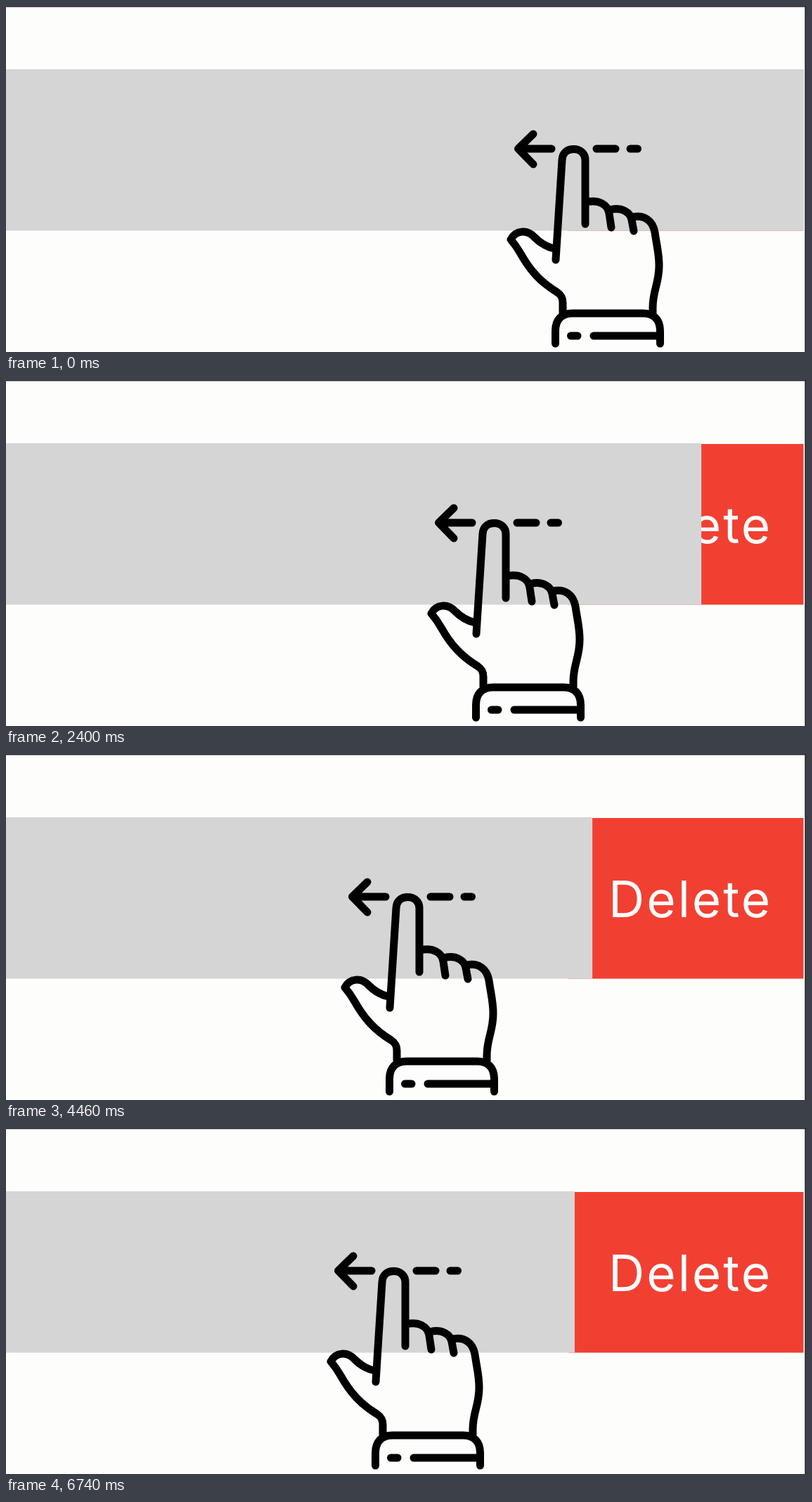
Write an HTML page that moves like this. It is 1138 by 492 pixels and loops after 6.76 s.

```html
<!DOCTYPE html>
<html lang="en">
<head>
<meta charset="utf-8">
<title>Swipe to delete</title>
<style>
  html, body { margin: 0; width: 100%; height: 100%; overflow: hidden; background: #fdfdfc; }
  svg { display: block; width: 1138px; height: 492px; }
  .label { font: 400 71px Inter, "Open Sans", sans-serif; letter-spacing: 3px; fill: #fff; }
  #hand { fill: none; stroke: #000; stroke-width: 11; stroke-linecap: round; stroke-linejoin: round; }
</style>
</head>
<body>
<svg viewBox="0 0 1138 492">
  <rect width="1138" height="492" fill="#fdfdfc"/>
  <rect x="800" y="91" width="334.5" height="228.5" fill="#f14032"/>
  <text class="label" x="857" y="232">Delete</text>
  <rect id="cover" y="90" width="1135" height="229.5" fill="#d5d5d5"/>
  <rect width="1138" height="1.5" fill="#25252b"/>
  <rect x="1136.3" width="1.7" height="492" fill="#25252b"/>
  <g id="hand">
    <!-- arrow and trail -->
    <path d="M750 182 L728.5 203 L750 225 M730 203 H776 M840 203 H867 M888 203 H898.5"/>
    <!-- index finger -->
    <path d="M782 361 L791 219 C791.5 209 798 203.500 807.500 203.500 C817 203.500 824 210 824 219 V310"/>
    <!-- knuckles and outer side -->
    <path d="M825 279 C843 275 856 282 858 295 L861 315"/>
    <path d="M860 289.500 C876 286 888 293 890 304 L893 320"/>
    <path d="M892 300 C908 297 920 305 923 322 C926 343 929 352 929 369 C929 395 920 404 920 429 V436"/>
    <!-- thumb -->
    <path d="M780 345 C767 342 759 336 752 329 C741 317 725 319 718 332 C724 339 728 345 732 352 C746 377 761 393 784 407 C790 411 792 415 792 422 V436"/>
    <!-- cuff -->
    <path d="M781.500 480 V462 C781.500 446 790 437 806 437 H906 C922 437 930.500 446 930.500 462 V480"/>
    <path d="M803.500 469 H813 M836 469 H930"/>
  </g>
</svg>
<script>
const LOOP = 6760;
// [time in ms, distance swiped in px]
const SWIPE = [
  [0, 0], [1190, 0], [1660, 41.5], [2400, 113], [2540, 125], [2960, 152.5],
  [3940, 214], [4460, 236], [4640, 244], [5440, 255.5], [6760, 256]
];
const hand = document.getElementById("hand");
const cover = document.getElementById("cover");

const slopes = SWIPE.slice(1).map(([t, x], i) => (x - SWIPE[i][1]) / (t - SWIPE[i][0]));

// Harmonic mean keeps the curve monotone between keys
function tangent(i) {
  const a = slopes[i - 1] || 0, b = slopes[i] || 0;
  return a * b > 0 ? 2 * a * b / (a + b) : 0;
}

function swipeAt(t) {
  let i = 0;
  while (i < SWIPE.length - 2 && t >= SWIPE[i + 1][0]) i++;
  const [t0, x0] = SWIPE[i], [t1, x1] = SWIPE[i + 1];
  const d = t1 - t0, u = (t - t0) / d, v = 1 - u;
  return x0 * v * v * (1 + 2 * u) + x1 * u * u * (3 - 2 * u)
    + d * u * v * (tangent(i) * v - tangent(i + 1) * u);
}

// Uneven cadence: two short steps, then a long one
function snap(t) {
  const r = t % 140;
  return t - r + (r < 20 ? 0 : r < 120 ? 20 : 120);
}

function draw(now) {
  const x = swipeAt(snap(now % LOOP));
  hand.setAttribute("transform", `translate(${-x} 0)`);
  cover.setAttribute("width", 1135 - 1.26 * x - 3.5 * Math.min(1, x / 20));
}

const start = performance.now();
function tick() {
  draw(performance.now() - start);
  requestAnimationFrame(tick);
}
tick();
</script>
</body>
</html>
```
